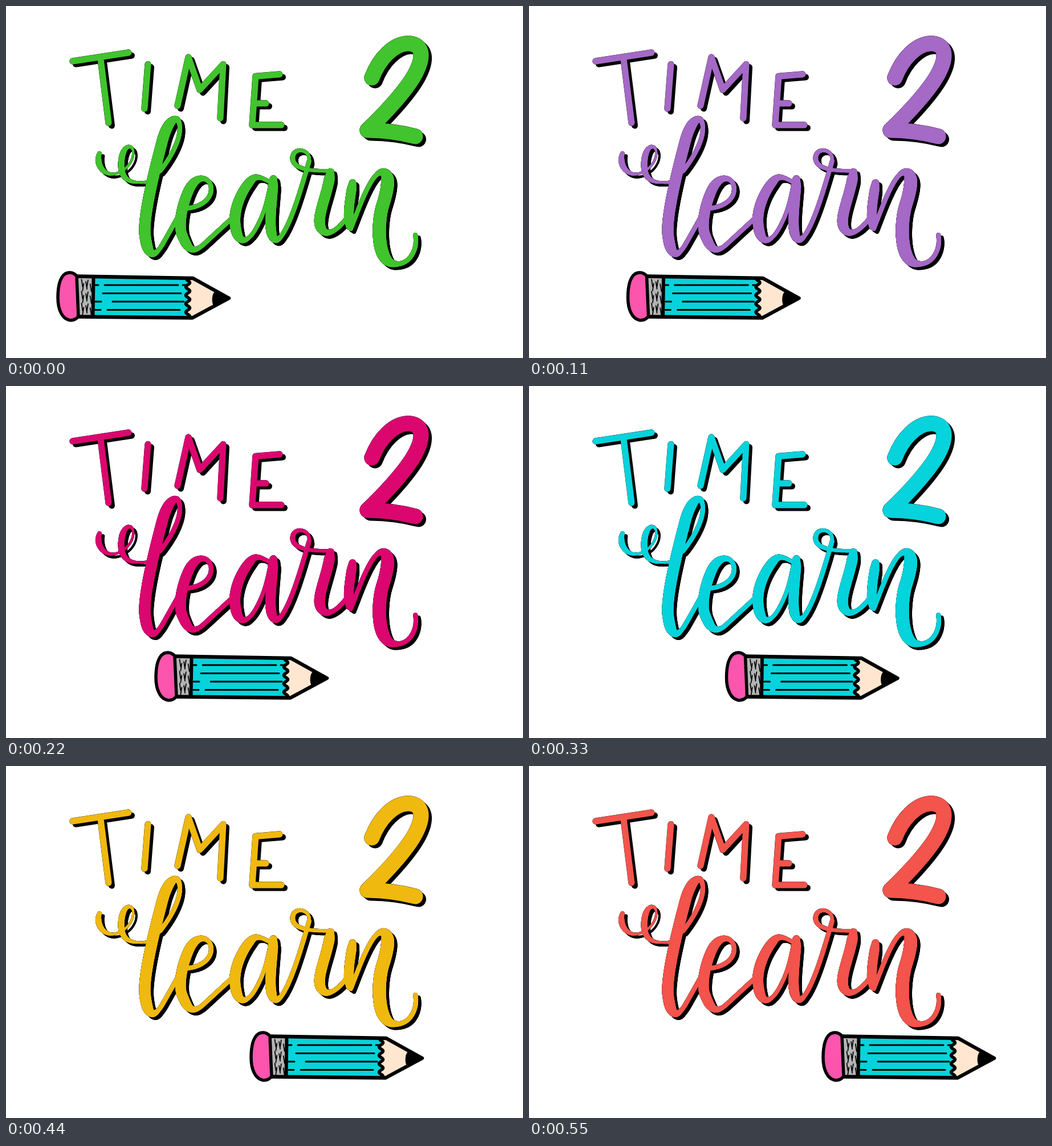
Recreate the animation shown at these times as an HTML page with a canvas. Size 907 by 618 pixels, loop 0.66 s.

```html
<!DOCTYPE html>
<html lang="en">
<head>
<meta charset="utf-8">
<title>Time 2 learn</title>
<style>
  html, body { margin: 0; width: 100%; height: 100%; overflow: hidden; background: #fff; }
  canvas { display: block; }
</style>
</head>
<body>
<canvas id="stage" width="907" height="618" role="img" aria-label="Time 2 learn"></canvas>
<script>
const ctx = document.getElementById('stage').getContext('2d');
const STEP = 110;

// lettering colour and pencil shift for each step
const steps = [
  ['#41c42d', 0],
  ['#a569c6', 82.5],
  ['#db076f', 172],
  ['#06d3db', 255.5],
  ['#f0b90f', 339],
  ['#f3544c', 425]
];

const time = new Path2D('M117 97L215 82M166 93L180 205M249 102.5L243 180' +
  'M301 175L320 90L340 147L381 102.5L376 197' +
  'M480 120L438 123.5L432 209L483 209M436 171H456');

const two = new Path2D('M642 126C655 92 680 67 704 66S736 84 719 117S658 195 634 218Q676 218 718 229');

const learn = [
  brush('M164 259C158 275 168 293 183 295S220 282 223 262S207 240 203 268S208 316 250 308', 11, 4),
  brush('M270 290C286 270 306 238 305 213S285 196 274 238S240 368 244 402S258 448 276 416L302 370', 20, 8),
  brush('M316 355C340 354 361 340 360 320S334 293 320 325S303 389 309 402S322 440 345 420L396 373', 19, 8),
  brush('M463 309C452 304 448 300 438 301S398 345 402 383S424 418 440 388S458 340 466 306', 19, 7),
  brush('M469 304C468 335 462 370 465 393S478 417 492 389S518 320 532 272', 18, 8),
  brush('M532 272C534 250 504 247 503 266S530 291 574 289', 9, 6),
  brush('M569 292C566 326 546 366 551 385S574 404 598 372', 19, 8),
  brush('M608 311C604 340 599 360 603 388', 17, 9),
  brush('M605 391C618 358 640 294 658 292S670 322 661 350S650 445 678 452S724 428 718 401', 23, 8)
];

// A pen that presses on the way down and lifts on the way up.
function brush(d, thick, thin) {
  const path = document.createElementNS('http://www.w3.org/2000/svg', 'path');
  path.setAttribute('d', d);
  const gap = 2, reach = 6, pts = [];
  for (let s = 0; s <= path.getTotalLength(); s += gap) pts.push(path.getPointAtLength(s));
  const press = pts.map((p, i) => i ? Math.max(0, p.y - pts[i - 1].y) / gap : 0);
  return pts.map((p, i) => {
    let sum = 0;
    for (let k = -reach; k <= reach; k++) sum += press[i + k] || 0;
    return { x: p.x, y: p.y, w: thin + (thick - thin) * sum / (2 * reach + 1) };
  });
}

function lettering(color, dx, dy, grow) {
  ctx.save();
  ctx.translate(dx, dy);
  ctx.strokeStyle = color;
  ctx.lineWidth = 11 + grow;
  ctx.stroke(time);
  ctx.lineWidth = 27 + grow;
  ctx.stroke(two);
  for (const pts of learn)
    for (let i = 1; i < pts.length; i++) {
      ctx.lineWidth = pts[i].w + grow;
      ctx.beginPath();
      ctx.moveTo(pts[i - 1].x, pts[i - 1].y);
      ctx.lineTo(pts[i].x, pts[i].y);
      ctx.stroke();
    }
  ctx.restore();
}

function shape(d, fill, width) {
  const path = new Path2D(d);
  if (fill) { ctx.fillStyle = fill; ctx.fill(path); }
  if (width) { ctx.lineWidth = width; ctx.stroke(path); }
}

// scalloped edge where the paint meets the wood
let scallop = 'M317 480';
for (let y = 481; y <= 546; y++)
  scallop += `L${319 + 3.5 * Math.sin((y - 482) * Math.PI / 7.4)} ${y}`;

// broken, slightly slanted scratches on the metal band
let scratches = '';
for (let col = 0; col < 5; col++)
  for (let row = 0; row < 3; row++) {
    const x = 132.5 + col * 3.8, y = 480 + row * 21 + col * 7 % 10;
    scratches += `M${x} ${y}l${col % 2 ? -2 : 2} 13`;
  }

// wood grain: start and end of the dashes on each row
const grain = [[157, 162, 173, 302, 310, 315], [170, 307], [157, 167, 187, 312], [157, 166, 178, 305]];
const dashes = grain.map((row, i) =>
  row.map((x, j) => `${j % 2 ? 'L' : 'M'}${x} ${490 + i * 14.5}`).join('')).join('');

function pencil(dx) {
  ctx.save();
  ctx.translate(dx, 0);
  ctx.strokeStyle = '#000';
  shape('M125 475H154V545H127Z', '#b4b4b4');
  shape('M154 476L319 479V547L154 545Z', '#06d3db');
  shape(scallop + 'L328 547L391 513L328 478Z', '#ffe6d0');
  shape(dashes, null, 3);
  shape(scratches, null, 1.7);
  shape(scallop, null, 5.5);
  shape('M370 500C361 504 361 521 366 527L392 513Z', '#000', 2);
  shape('M125 474.5L328 478L391 513L327 547.5L127 545.5', null, 6.5);
  shape('M153.5 476L152.5 545', null, 6);
  shape('M124 474C118 467 110 467 104 470C95 476 91 492 91 512C91 534 99 549 111 551.5' +
    'C118 552.5 123 550 127 545Z', '#fb55ae', 5.5);
  ctx.restore();
}

let shown = -1;

function draw(now) {
  const step = Math.floor(now / STEP) % steps.length;
  if (step !== shown) {
    shown = step;
    const [color, dx] = steps[step];
    ctx.fillStyle = '#fff';
    ctx.fillRect(0, 0, 907, 618);
    lettering('#000', 5.5, 5, 0);
    lettering('#000', 0, 0, 0.4);
    lettering(color, 0, 0, 0);
    pencil(dx);
  }
  requestAnimationFrame(draw);
}

ctx.lineCap = ctx.lineJoin = 'round';
draw(0);
</script>
</body>
</html>
```
